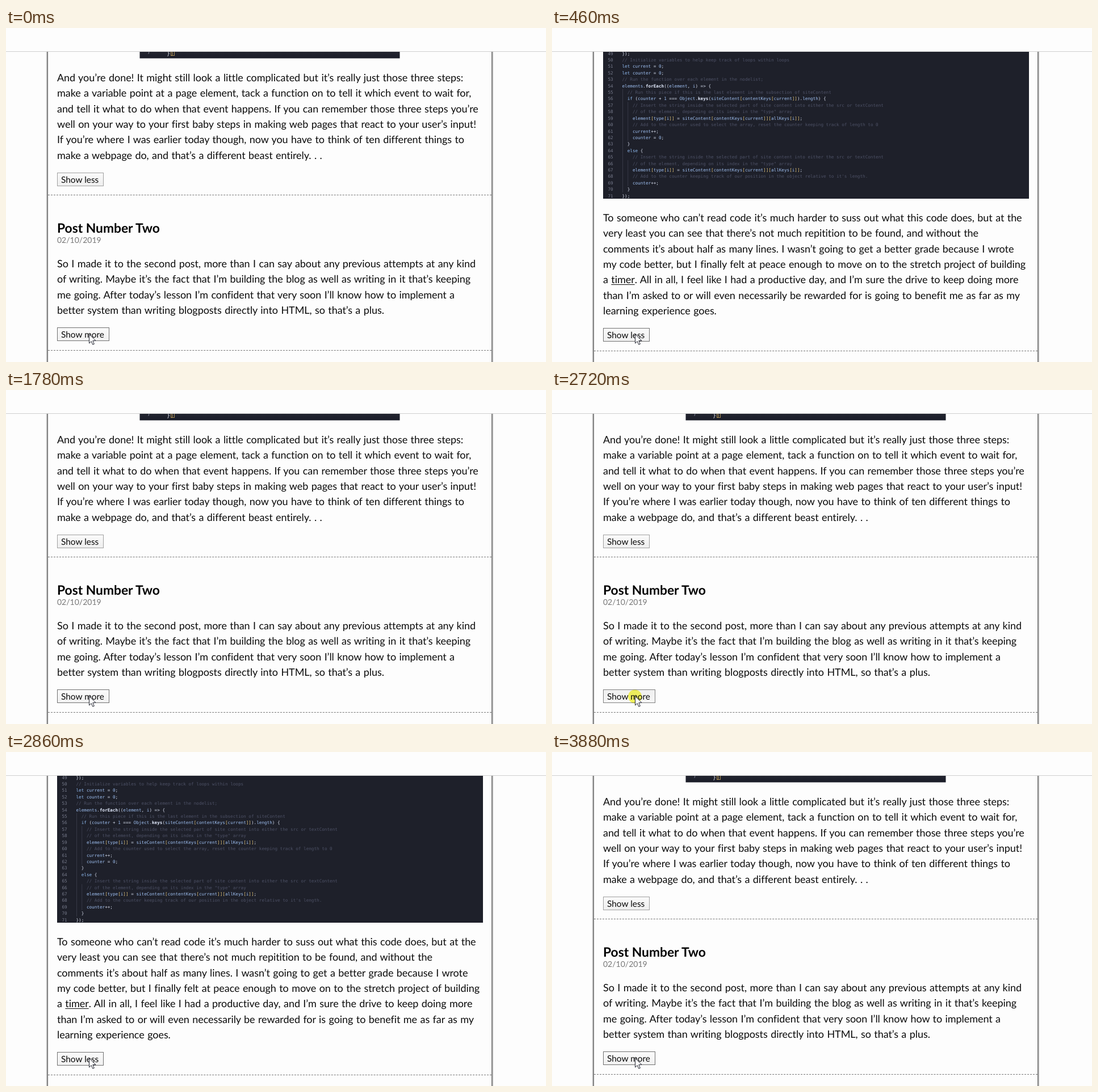
An HTML page with a canvas for the animation above (4340 ms loop, 951 by 589 pixels).

```html
<!DOCTYPE html>
<html lang="en">
<head>
<meta charset="utf-8">
<title>Blog posts</title>
<style>
html, body { margin: 0; width: 100%; height: 100%; overflow: hidden; background: #fdfdfd; }
canvas { display: block; }
</style>
</head>
<body>
<canvas id="stage" width="951" height="589"></canvas>
<script>
const ctx = document.getElementById('stage').getContext('2d');
const LOOP = 4340;
const SANS = 'Lato, "Open Sans", sans-serif';
const MONO = '"DejaVu Sans Mono", monospace';
const PAGE = '#fdfdfd';
const LEFT = 90;
const LINE = 27.36;

// Start time, post expanded, button state
const TIMELINE = [
  [0, false, 'hover'], [310, false, 'pressed'],
  [460, true, 'hover'], [1690, true, 'pressed'],
  [1780, false, 'hover'], [2720, false, 'pressed'],
  [2780, true, 'idle'], [2860, true, 'hover'], [3720, true, 'pressed'],
  [3880, false, 'hover']
];

const PREVIOUS_POST = [
  'And you’re done! It might still look a little complicated but it’s really just those three steps:',
  'make a variable point at a page element, tack a function on to tell it which event to wait for,',
  'and tell it what to do when that event happens. If you can remember those three steps you’re',
  'well on your way to your first baby steps in making web pages that react to your user’s input!',
  'If you’re where I was earlier today though, now you have to think of ten different things to',
  'make a webpage do, and that’s a different beast entirely. . .'
];
const SUMMARY = [
  'So I made it to the second post, more than I can say about any previous attempts at any kind',
  'of writing. Maybe it’s the fact that I’m building the blog as well as writing in it that’s keeping',
  'me going. After today’s lesson I’m confident that very soon I’ll know how to implement a',
  'better system than writing blogposts directly into HTML, so that’s a plus.'
];
const ENDING = [
  'To someone who can’t read code it’s much harder to suss out what this code does, but at the',
  'very least you can see that there’s not much repitition to be found, and without the',
  'comments it’s about half as many lines. I wasn’t going to get a better grade because I wrote',
  'my code better, but I finally felt at peace enough to move on to the stretch project of building',
  'a _timer_. All in all, I feel like I had a productive day, and I’m sure the drive to keep doing more',
  'than I’m asked to or will even necessarily be rewarded for is going to benefit me as far as my',
  'learning experience goes.'
];
const CODE = `});
// Initialize variables to help keep track of loops within loops
let current = 0;
let counter = 0;
// Run the function over each element in the nodelist;
elements.forEach((element, i) => {
  // Run this piece if this is the last element in the subsection of siteContent
  if (counter + 1 === Object.keys(siteContent[contentKeys[current]]).length) {
    // Insert the string inside the selected part of site content into either the src or textContent
    // of the element, depending on its index in the "type" array
    element[type[i]] = siteContent[contentKeys[current]][allKeys[i]];
    // Add to the counter used to select the array, reset the counter keeping track of length to 0
    current++;
    counter = 0;
  }
  else {
    // Insert the string inside the selected part of site content into either the src or textContent
    // of the element, depending on its index in the "type" array
    element[type[i]] = siteContent[contentKeys[current]][allKeys[i]];
    // Add to the counter keeping track of our position in the object relative to it's length.
    counter++;
  }
});`.split('\n');

function rect(x, y, w, h, color) {
  ctx.fillStyle = color;
  ctx.fillRect(x, y, w, h);
}

function text(str, x, y, font, color = '#0c0c0c') {
  ctx.font = font;
  ctx.fillStyle = color;
  ctx.fillText(str, x, y);
  return ctx.measureText(str).width;
}

// Underscores enclose underlined words
function paragraph(lines, baseline) {
  const font = '18px ' + SANS;
  ctx.wordSpacing = '0.9px';
  ctx.letterSpacing = '-0.06px'; // also turns ligatures off
  lines.forEach((line, row) => {
    const y = baseline + row * LINE;
    let x = LEFT;
    line.split('_').forEach((part, i) => {
      const w = text(part, x, y, font);
      if (i % 2) rect(x, Math.round(y) + 2, w, 1, '#0c0c0c');
      x += w;
    });
  });
  ctx.wordSpacing = ctx.letterSpacing = '0px';
}

// Gaps shrink slightly so that the rule ends on a whole dash
function dashedRule(y) {
  const length = 781, dash = 3, count = 157;
  ctx.strokeStyle = '#777';
  ctx.lineWidth = 1;
  ctx.setLineDash([dash, (length - dash * count) / (count - 1)]);
  ctx.beginPath();
  ctx.moveTo(74, y + 0.5);
  ctx.lineTo(74 + length, y + 0.5);
  ctx.stroke();
  ctx.setLineDash([]);
}

function button(label, y, w, state) {
  const [border, top, bottom] = {
    idle: ['#a0a0a0', '#fafafa', '#eeeeee'],
    hover: ['#707070', '#fbfbfb', '#f0f0f0'],
    pressed: ['#808080', '#efefef', '#f6f6f6']
  }[state];
  const fill = ctx.createLinearGradient(0, y, 0, y + 24);
  fill.addColorStop(0, top);
  fill.addColorStop(1, bottom);
  rect(LEFT, y, w, 24, border);
  rect(LEFT + 1, y + 1, w - 2, 22, fill);
  text(label, 97, y + 17.5, '15.4px ' + SANS);
}

function tokenStyle(token) {
  if (token.startsWith('//')) return ['#4d5166'];
  if (/^(let|if|else)$/.test(token)) return ['#8fb9ee'];
  if (/^(forEach|keys)$/.test(token)) return ['#e4ecff', 'bold '];
  if (/^[[\]]$/.test(token)) return ['#e2c47a'];
  if (/^\w+$/.test(token)) return ['#9fc0f2'];
  return ['#d4daea'];
}

function codeBlock() {
  const cell = 4.604, pitch = 11.41, x0 = 123.5, y0 = 47.6;
  const font = '7.65px ' + MONO;
  rect(LEFT, 42, 750, 259, '#1e202a');

  const guide = (col, from, to) =>
    rect(x0 + col * cell + 0.5, y0 + (from - 49) * pitch - 8.5, 1, (to - from + 1) * pitch, '#363947');
  guide(0, 55, 70);
  guide(2, 57, 62);
  guide(2, 66, 69);

  CODE.forEach((line, row) => {
    const y = y0 + row * pitch;
    text(String(49 + row), 98.5, y, font, '#777b8c');
    for (const match of line.matchAll(/\/\/.*|\w+|[^\w\s]/g)) {
      const [color, weight = ''] = tokenStyle(match[0]);
      // Words keep to the character grid
      for (const word of match[0].matchAll(/\S+/g)) {
        text(word[0], x0 + (match.index + word.index) * cell, y, weight + font, color);
      }
    }
  });
}

function codeRemnant() {
  const fill = ctx.createLinearGradient(0, 42, 0, 54);
  fill.addColorStop(0, '#22242f');
  fill.addColorStop(1, '#1a1c28');
  rect(235.5, 42, 458, 11.5, fill);
  text('}', 249, 44, '9px ' + MONO, '#8b8fa0');
  text('}', 283, 48, '10px ' + MONO, '#d8dbe5');
  ctx.strokeStyle = '#a58a54';
  ctx.lineWidth = 1;
  ctx.strokeRect(290.5, 40.5, 6, 8);
  text(')', 290, 48, '9px ' + MONO, '#e0b65c');
}

function pointer() {
  ctx.beginPath();
  for (const [x, y] of [[0, 0], [0, 16], [3.7, 12.6], [6.3, 18.3], [8.8, 17.2], [6.3, 11.6], [11.4, 11.4]]) {
    ctx.lineTo(146.5 + x, 540 + y);
  }
  ctx.closePath();
  ctx.fillStyle = '#fff';
  ctx.fill();
  ctx.strokeStyle = '#20222e';
  ctx.lineWidth = 1;
  ctx.stroke();
}

function clickSpot() {
  ctx.globalCompositeOperation = 'multiply';
  ctx.fillStyle = '#fafa62';
  ctx.beginPath();
  ctx.arc(146, 540.5, 12, 0, 2 * Math.PI);
  ctx.fill();
  ctx.globalCompositeOperation = 'source-over';
}

function collapsedPost(state) {
  codeRemnant();
  paragraph(PREVIOUS_POST, 94);
  button('Show less', 255, 82, 'idle');
  dashedRule(294);
  text('Post Number Two', LEFT, 360.5, 'bold 22.8px ' + SANS, '#000');
  text('02/10/2019', LEFT, 379, '14px ' + SANS, '#777');
  paragraph(SUMMARY, 422);
  button('Show more', 528, 92, state);
  dashedRule(568);
}

function expandedPost(state) {
  codeBlock();
  paragraph(ENDING, 341);
  button('Show less', 529, 82, state);
  dashedRule(569);
}

function pageFrame() {
  rect(0, 0, 951, 41, PAGE);
  rect(0, 41, 951, 1, '#cfcfcf');
  ['#707070', '#959595', '#cdcdcd', '#efefef'].forEach((shade, i) => {
    rect(73 - i, 42, 1, 547, shade);
    rect(855 + i, 42, 1, 547, shade);
  });
}

function draw(time) {
  const [, expanded, state] = TIMELINE.findLast(([start]) => start <= time);
  ctx.textRendering = 'geometricPrecision';
  rect(0, 0, 951, 589, PAGE);
  (expanded ? expandedPost : collapsedPost)(state);
  pageFrame();
  if (state === 'pressed') clickSpot();
  pointer();
}

const began = performance.now();
function tick() {
  draw((performance.now() - began) % LOOP);
  requestAnimationFrame(tick);
}
tick();
</script>
</body>
</html>
```
